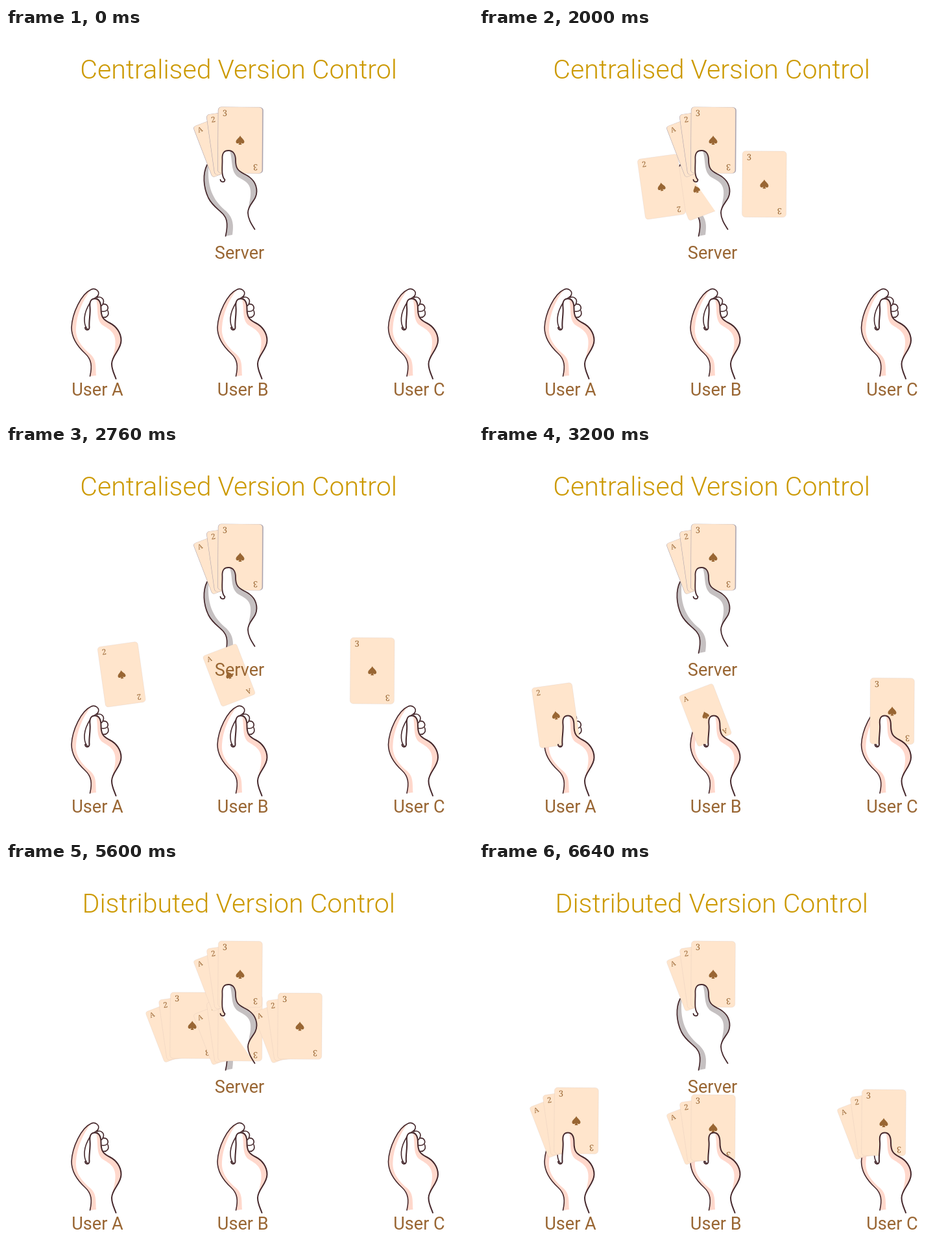
Recreate the animation shown at these times as an HTML page with a canvas. Size 720 px wide and 600 px high, loop 9.04 s.

```html
<!DOCTYPE html>
<html lang="en">
<head>
<meta charset="utf-8">
<title>Version control</title>
<style>
  html, body { margin: 0; width: 100%; height: 100%; overflow: hidden; background: #fff; }
  canvas { display: block; }
</style>
</head>
<body>
<canvas id="stage" width="720" height="600"></canvas>
<script>
const ctx = document.getElementById('stage').getContext('2d');

const LOOP = 9040, STEP = 40;
const DEAL_START = 1560, DEAL_STEPS = 42;
const COPY_START = 5040, COPY_STEPS = 40;

const BROWN = '#996633', GOLD = '#cc9900', INK = '#45282c';
const CARD = '#ffe5cc', CARD_EDGE = 'rgba(160,140,150,0.16)', CARD_SHADOW = '#aaa4b0';
const GREY = '#c5c0c1', SKIN = '#ffd8cc';

const DECK_HOME = { x: 361, y: 173 };
const CARDS = [
  { rank: 'A', x: 329.5, y: 181.5, scale: 0.82, tilt: -21, goal: { x: 349, y: 416.5 } },
  { rank: '2', x: 346.5, y: 176, scale: 0.92, tilt: -8, goal: { x: 118.5, y: 417 } },
  { rank: '3', x: 361, y: 173, scale: 1, tilt: 0.4, goal: { x: 637, y: 410.5 } }
];
const DECK_GOALS = [{ x: 150, y: 399 }, { x: 361, y: 410 }, { x: 624, y: 402 }];
const USERS = [
  { name: 'User A', dx: 0, labelX: 141 },
  { name: 'User B', dx: 225, labelX: 365.2 },
  { name: 'User C', dx: 488.5, labelX: 637 }
];

const spade = new Path2D('M0-7C2-3 6.5-1 6.5 2.5C6.5 5.5 2.5 6 1 3.5L2.5 7H-2.5L-1 3.5C-2.5 6-6.5 5.5-6.5 2.5C-6.5-1-2-3 0-7Z');

// Each hand has a back layer behind the cards and a thumb layer in front of them.
const serverSide = 'M310 211C303 225 304 245 312 262C321 280 337 283 340 297C342 307 340 314 338.5 321';
const serverPalm = 'C351 189 354 196 354 204C354 217 358 220 367 225C380 231 386.5 241 386.5 252C386.5 267 373 271 373 285';
const serverHand = {
  color: GREY, backWidth: 1.7, frontWidth: 1.8,
  back: new Path2D(serverSide),
  backShade: new Path2D(serverSide + 'L349 319C351 305 351 294 340 283C323 269 309 250 312.5 212Z'),
  front: new Path2D('M330.5 234C331 238 337 239 337.5 234C331 228 334 212 333.5 202C333 192 337 189 343 189' +
    serverPalm + 'C373 294 378 302 383.5 310.5'),
  frontShade: new Path2D('M343 189' + serverPalm + 'C374 270 378 262 377 251C376 238 366 235 358 230C346 222 350 205 345 189Z')
};

const userSide = 'M129.5 537C133 522 132 511 122 502C109 490 101 478 101 462C102 440 116 410 131 403.5';
const userPalm = 'C144 417.5 146.5 424 146.5 433C146.5 446 150 450 160 455C170 460 177.5 470 177.5 482C177.5 496 163 505 163 518';
const userHand = {
  color: SKIN, backWidth: 1.6, frontWidth: 2,
  back: new Path2D(userSide + 'C138 400 144 406 142.5 411C142 413 140 415 138 416' +
    'C130 420 120 437 121 452C121.3 458 123 462 126 465' +
    'M140 416C146 413 152 418 150 424Q149 428 146 429' +
    'M150 426C156 425 159 431 156 435Q153 438 148 437' +
    'M157 436C159.5 442 156 448 148 446'),
  backShade: new Path2D(userSide + 'C118 420 109 442 108 462C107 475 112 488 130 503C140 512 138 522 139 536Z'),
  front: new Path2D('M122 462C122 467 129 467 128.5 461C127.5 453 130.5 440 129.5 431C128.5 422 131 417.5 137 417.5' +
    userPalm + 'C163 527 167 534 169.5 541'),
  frontShade: new Path2D('M137 417.5' + userPalm + 'C165 503 169 495 168.5 483C168 469 158 464 150 459C138 451 143 435 139 418Z')
};

const clamp = (v, max) => Math.max(0, Math.min(max, v));
const mix = (a, b, p) => ({ x: a.x + (b.x - a.x) * p, y: a.y + (b.y - a.y) * p });

function text(str, x, y, font, color) {
  ctx.font = font;
  ctx.fillStyle = color;
  ctx.textAlign = 'center';
  ctx.textBaseline = 'alphabetic';
  ctx.fillText(str, x, y);
}

function label(str, x, y) {
  text(str, x, y, '400 27.1px Roboto, sans-serif', BROWN);
}

function drawCard(card, pos, shadow) {
  ctx.save();
  ctx.translate(pos.x, pos.y);
  ctx.rotate(card.tilt * Math.PI / 180);
  ctx.scale(card.scale, card.scale);
  if (shadow) {
    ctx.fillStyle = CARD_SHADOW;
    ctx.beginPath();
    ctx.roundRect(-34.5, -51, 70, 102, 5);
    ctx.fill();
  }
  ctx.beginPath();
  ctx.roundRect(-34, -51, 68, 102, 5);
  ctx.fillStyle = CARD;
  ctx.fill();
  ctx.strokeStyle = CARD_EDGE;
  ctx.lineWidth = 0.8;
  ctx.stroke();
  ctx.fillStyle = BROWN;
  ctx.fill(spade);
  for (let i = 0; i < 2; i++) {
    text(card.rank, -23.8, -37, '13px "Noto Serif", serif', BROWN);
    ctx.rotate(Math.PI);
  }
  ctx.restore();
}

function drawDeck(pos, shadow) {
  for (const card of CARDS) {
    drawCard(card, { x: card.x + pos.x - DECK_HOME.x, y: card.y + pos.y - DECK_HOME.y }, shadow);
  }
}

function drawLayer(hand, layer, dx = 0) {
  ctx.save();
  ctx.translate(dx, 0);
  if (layer === 'front') {
    ctx.fillStyle = '#fff';
    ctx.fill(hand.front);
  }
  ctx.fillStyle = hand.color;
  ctx.fill(hand[layer + 'Shade']);
  ctx.strokeStyle = INK;
  ctx.lineWidth = hand[layer + 'Width'];
  ctx.lineCap = ctx.lineJoin = 'round';
  ctx.stroke(hand[layer]);
  ctx.restore();
}

function draw(time) {
  const tick = Math.floor(time / STEP) * STEP;
  const distributed = tick >= COPY_START;
  const deal = clamp((tick - DEAL_START) / STEP + 1, DEAL_STEPS) / DEAL_STEPS;
  const copy = clamp((tick - COPY_START) / STEP, COPY_STEPS) / COPY_STEPS;

  ctx.fillStyle = '#fff';
  ctx.fillRect(0, 0, 720, 600);
  text((distributed ? 'Distributed' : 'Centralised') + ' Version Control', 358.7, 78,
    '300 41.1px Roboto, sans-serif', GOLD);

  drawLayer(serverHand, 'back');
  for (const user of USERS) drawLayer(userHand, 'back', user.dx);

  if (distributed) {
    for (const goal of DECK_GOALS) drawDeck(mix(DECK_HOME, goal, copy));
  } else {
    for (const card of CARDS) drawCard(card, mix(card, card.goal, deal));
  }

  drawDeck(DECK_HOME, copy === 0);
  drawLayer(serverHand, 'front');
  label('Server', 360, 356);
  for (const user of USERS) {
    drawLayer(userHand, 'front', user.dx);
    label(user.name, user.labelX, 567);
  }
}

const start = performance.now();
function loop() {
  draw((performance.now() - start) % LOOP);
  requestAnimationFrame(loop);
}
loop();
</script>
</body>
</html>
```
